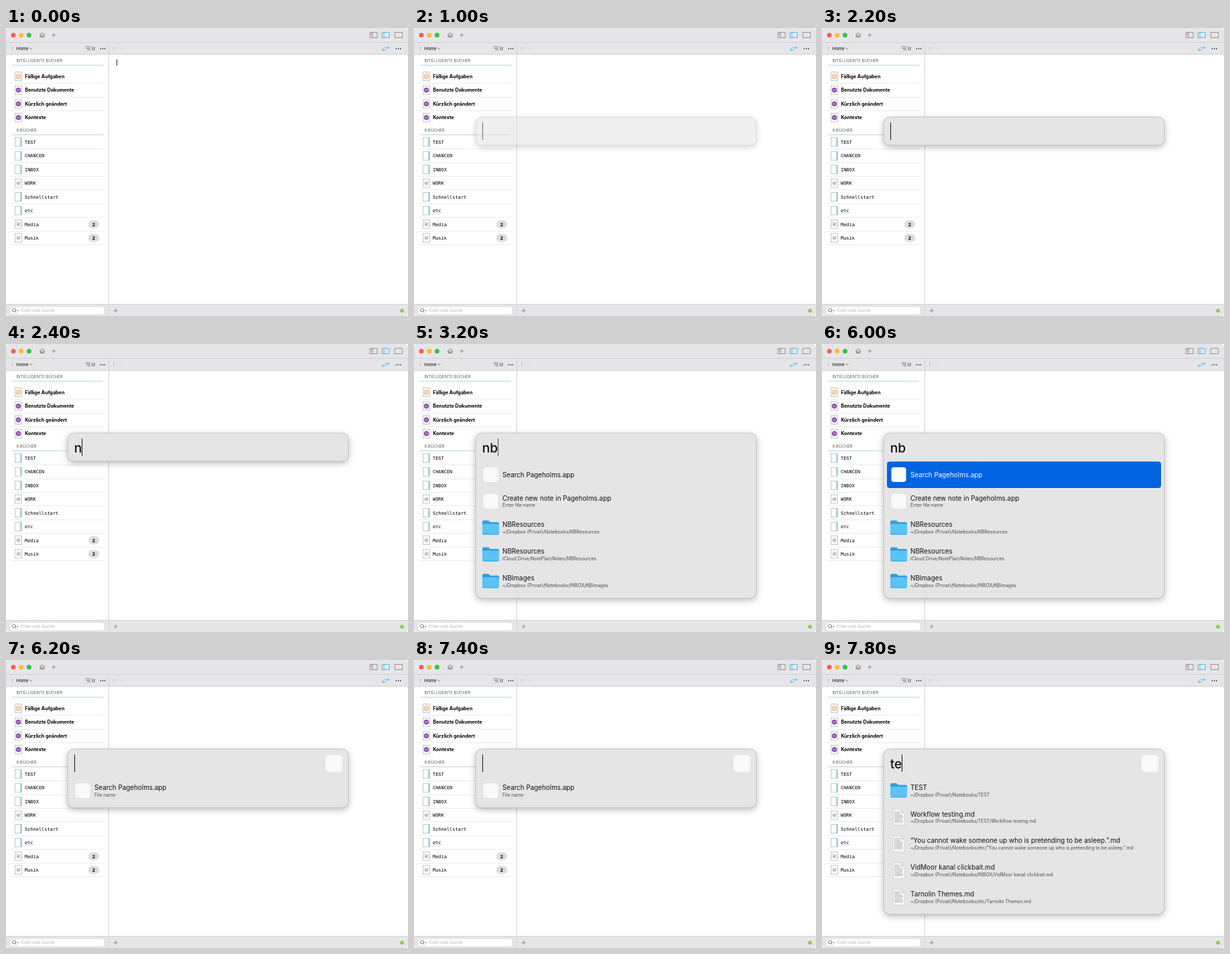
These frames come from a looping animation (600x430 px, 8000 ms). An HTML page:

```html
<!DOCTYPE html>
<html lang="de">
<head>
<meta charset="utf-8">
<title>Notizen suchen</title>
<style>
html, body { margin: 0; width: 100%; height: 100%; overflow: hidden; background: #fff; }
svg { display: block; width: 600px; height: 430px; border-radius: 5px; background: #fff;
  font-family: Inter, "Open Sans", sans-serif; }
.line { fill: none; stroke: #555; stroke-width: .75; stroke-linecap: round; stroke-linejoin: round; }
.soft { stroke: #777; }
.pale { stroke: #aaa; }
.faint { stroke: #d0d0d0; }
.blue { stroke: #2ea9ec; }
.orange { stroke: #f09a38; }
.head { font-size: 6.05px; fill: #606060; }
.smart { font-size: 7.2px; font-weight: 700; }
.book { font: 6.95px "DejaVu Sans Mono", monospace; }
.query { font-size: 19.2px; font-weight: 450; fill: #111; }
.title { font-size: 9.85px; fill: #111; }
.sub { font-size: 6.9px; fill: #4a4a4a; }

/* Each step holds until the next; 5% is 400 ms. */
.a { animation: 8s step-end infinite; }
.editor-caret { animation-name: editor-caret; }
.panel { animation-name: panel; }
.box { animation-name: box; filter: drop-shadow(0 3px 5px #0004); }
.caret { animation-name: blink, caret-x; }
.typed-n { animation-name: typed-n; }
.typed-nb { animation-name: typed-nb; }
.chosen { animation-name: chosen; }
.scope { animation-name: scope; }
.prompt { animation-name: prompt; }
.found { animation-name: found; }
@keyframes editor-caret { 0% { opacity: 1 } 5% { opacity: 0 } 10% { opacity: 1 } 12.5% { opacity: 0 } }
@keyframes panel { 0% { opacity: 0 } 12.5% { opacity: .6 } 15% { opacity: 1 } }
@keyframes box {
  0% { height: 42px } 32.5% { height: 246.5px } 77.5% { height: 87.5px } 97.5% { height: 246.5px }
}
@keyframes blink {
  0% { opacity: 1 } 20% { opacity: 0 } 25% { opacity: .5 } 27.5% { opacity: 1 }
  37.5% { opacity: 0 } 40% { opacity: .75 } 45% { opacity: 0 } 50% { opacity: 1 }
  55% { opacity: 0 } 57.5% { opacity: .75 } 62.5% { opacity: 0 } 65% { opacity: .5 }
  67.5% { opacity: 1 } 75% { opacity: 0 } 77.5% { opacity: 1 } 85% { opacity: 0 }
  90% { opacity: .5 } 92.5% { opacity: 1 }
}
@keyframes caret-x {
  0% { transform: none } 30% { transform: translateX(11px) } 32.5% { transform: translateX(23px) }
  77.5% { transform: none } 97.5% { transform: translateX(17px) }
}
@keyframes typed-n { 0% { opacity: 0 } 30% { opacity: 1 } 32.5% { opacity: 0 } }
@keyframes typed-nb { 0% { opacity: 0 } 32.5% { opacity: 1 } 77.5% { opacity: 0 } }
@keyframes chosen { 0% { opacity: 0 } 50% { opacity: 1 } 77.5% { opacity: 0 } }
@keyframes scope { 0% { opacity: 0 } 77.5% { opacity: 1 } }
@keyframes prompt { 0% { opacity: 0 } 77.5% { opacity: 1 } 97.5% { opacity: 0 } }
@keyframes found { 0% { opacity: 0 } 97.5% { opacity: 1 } }
</style>
</head>
<body>
<svg id="stage" viewBox="0 0 600 430" xmlns="http://www.w3.org/2000/svg"></svg>
<script>
const rect = (x, y, w, h, fill, more = '') =>
  `<rect x="${x}" y="${y}" width="${w}" height="${h}" fill="${fill}" ${more}/>`;
const circle = (x, y, r, fill, more = '') => `<circle cx="${x}" cy="${y}" r="${r}" fill="${fill}" ${more}/>`;
const path = (d, kind = '') => `<path class="line ${kind}" d="${d}"/>`;
const text = (x, y, kind, s, more = '') => `<text x="${x}" y="${y}" class="${kind}" ${more}>${s}</text>`;
const group = (kind, ...parts) => `<g class="a ${kind}">${parts.join('')}</g>`;
const dots = (x, y) => [0, 3.2, 6.4].map(d => circle(x + d, y, .9, '#444')).join('');
const rule = (y, x1 = 7, x2 = 146, color = '#ebebeb') => rect(x1, Math.round(y), x2 - x1, 1, color);
const headRule = y => rule(y, 9, 145, '#b4d6e2');

const page = y => rect(13.5, y - 6.5, 10, 13, '#fff', 'stroke="#b5b5b5" stroke-width=".8"');
const smartIcon = (y, orange) => page(y) + (orange
  ? circle(18.5, y, 3.2, '#fff3e2', 'stroke="#f09a38"') + path(`M17 ${y}l1.2 1.3 2-2.6`, 'orange')
  : circle(18.5, y, 3.7, '#8144a8') + circle(18.5, y, 1.5, 'none', 'stroke="#e5d3f0" stroke-width=".8"'));
const bookIcon = (y, checked) => page(y) + (checked
  ? circle(18.5, y, 3.4, '#dadada') + path(`M17 ${y}l1.2 1.3 2-2.8`, 'soft')
  : rect(21, y - 6, 2.7, 12, '#a5d3e2'));

function windowChrome() {
  const bar = '#e6e6e9', edge = '#d3d3d6';
  return rect(0, 0, 600, 40, bar) + rect(0, 21, 600, 1, edge) + rect(0, 39, 600, 1, edge)
    + rect(0, 413, 600, 17, bar) + rect(0, 412, 600, 1, edge) + rect(153, 22, 1, 408, edge)
    + ['#fc5b57', '#fdbc2e', '#28c840'].map((c, i) => circle(11 + i * 11.7, 10.7, 3.45, c)).join('')
    + path('M50.3 10.6L54 7l3.7 3.6M51.3 10v3.7h1.9v-2.3h1.6v2.3h1.9V10')
    + path('M68.7 10.5h5M71.2 8v5', 'soft')
    + path('M543.5 6.5h10.5v8h-10.5zM547 6.5v8M544.8 8.5h1M544.8 10.5h1', 'soft')
    + path('M561.5 6.5H572v8h-10.5zM564 6.5v8', 'blue')
    + path('M580.5 6.5h11v8h-11z', 'soft')
    + path('M11 28l-3 2.8 3 2.8M162 28.3l-2.3 2.5 2.3 2.5', 'pale')
    + path('M169.5 28.6l2 2.2-2 2.2', 'faint')
    + text(15.3, 33.2, '', 'Home', 'font-size="6.5"') + path('M35.5 29.8l1.7 1.8 1.7-1.8')
    + path('M118.8 28h6.7M120.5 30.5h5M122 33h3.5') + text(128, 33.2, '', 'U', 'font-size="6.5"')
    + dots(141.3, 31) + dots(582.4, 31)
    + path('M565.5 29.3h6M569.7 27.3l2 2-2 2M567.5 32.4h-6M563.3 30.4l-2 2 2 2', 'blue')
    + rect(6, 416, 141, 12, '#fff', 'rx="4" stroke="#d5d5d8" stroke-width=".6"')
    + '<circle class="line" cx="11.8" cy="421.2" r="2.5"/>' + path('M13.7 423.1l1.7 1.8M16.2 421.2l1.2 1.3 1.2-1.3')
    + text(22, 424.4, '', 'Filter und Suche', 'font-size="6.55" fill="#b4b4b7"')
    + path('M161 422h5M163.5 419.5v5', 'soft') + circle(591, 422, 3, '#90d04f');
}

function sidebar() {
  const smart = ['Fällige Aufgaben', 'Benutzte Dokumente', 'Kürzlich geändert', 'Kontexte'];
  const books = ['TEST', 'CHANCEN', 'INBOX', 'WORK', 'Schnellstart', 'etc', 'Media', 'Musik'];
  const checked = ['WORK', 'Media', 'Musik'];
  const step = 20.45;
  const badge = y => rect(123, y - 6, 16, 12, '#dcdcdc', 'rx="6"')
    + text(131, y + 2.5, 'smart', '2', 'text-anchor="middle" style="font-size:6.8px"');
  return text(15.4, 50.8, 'head', 'INTELLIGENTE BÜCHER') + headRule(55)
    + smart.map((name, i) => {
      const y = 72.3 + i * step;
      return smartIcon(y, i === 0) + text(28.2, y + 2.6, 'smart', name) + (i < 3 ? rule(y + 10) : '');
    }).join('')
    + text(15.4, 155, 'head', '8 BÜCHER') + headRule(159)
    + books.map((name, i) => {
      const y = 170.3 + i * step;
      return bookIcon(y, checked.includes(name)) + text(28, y + 2.5, 'book', name)
        + rule(y + 9.8) + (i > 5 ? badge(y) : '');
    }).join('');
}

const appIcon = (x, y, size) => rect(x, y, size, size, '#f9f9f9', 'rx="4"');
const icons = {
  app: y => appIcon(103.5, y - 11, 22),
  folder: y => `<path fill="#2e9fd8" d="M102 ${y - 9}q0-2 2-2h6q1.5 0 2.5 1.2l1 1.3h11.5q2 0 2 2v5h-25z"/>`
    + rect(102, y - 6, 25, 16.5, '#5cc3f4', 'rx="1.8"') + rect(102.5, y + 8.8, 24, .8, '#42aee4'),
  note: y => `<path fill="#f4f4f4" stroke="#cacaca" stroke-width=".6" d="M106 ${y - 12}h11.5l6 6v18H106z"/>`
    + `<path fill="#d9d9d9" d="M117.5 ${y - 12}l6 6h-6z"/>`
    + Array.from({ length: 8 }, (_, i) =>
      rect(108, y - 8 + i * 2.1, i < 2 ? 8 : 13 - (i % 3), .8, '#a8a8a8')).join('')
};

const rowY = i => 195 + i * 39.8;
function row(i, icon, title, sub, more = '') {
  const y = rowY(i);
  return icons[icon](y) + text(132, y + (sub ? -1.2 : 3.8), 'title', title, more)
    + (sub ? text(132, y + 8.6, 'sub', sub) : '');
}

const app = 'Pageholms.app';
const root = '~/Dropbox (Privat)/Notebooks/';
const notes = [
  ['TEST/', 'Workflow testing.md'],
  ['etc/', '“You cannot wake someone up who is pretending to be asleep.”.md'],
  ['INBOX/', 'VidMoor kanal clickbait.md'],
  ['etc/', 'Tarnolin Themes.md']
];

function searchPanel() {
  const box = '<rect class="a box" x="92" y="133" width="419" height="42" rx="9" fill="#e5e5e5" '
    + 'stroke="#b9b9b9" stroke-width=".7"/>';
  const query = s => text(101.7, 162.3, 'query', s);
  return group('panel', box,
    group('typed-n', query('n')),
    group('typed-nb', query('nb'),
      row(0, 'app', `Search ${app}`),
      row(1, 'app', `Create new note in ${app}`, 'Enter file name'),
      row(2, 'folder', 'NBResources', root + 'NBResources'),
      row(3, 'folder', 'NBResources', 'iCloud Drive/NotePlan/Notes/NBResources'),
      row(4, 'folder', 'NBImages', root + 'INBOX/NBImages')),
    group('chosen', rect(97, 175.5, 409, 39.5, '#0064e1', 'rx="4"'),
      row(0, 'app', `Search ${app}`, '', 'style="fill:#fff"')),
    group('scope', appIcon(477, 142, 25)),
    group('prompt', row(0, 'app', `Search ${app}`, 'File name')),
    group('found', query('te'),
      row(0, 'folder', 'TEST', root + 'TEST'),
      ...notes.map(([dir, name], i) => row(i + 1, 'note', name, root + dir + name))),
    rect(102, 141, 1, 26, '#111', 'class="a caret"'));
}

document.getElementById('stage').innerHTML = windowChrome() + sidebar()
  + rect(165, 47, 1, 9, '#222', 'class="a editor-caret"') + searchPanel();
</script>
</body>
</html>
```
